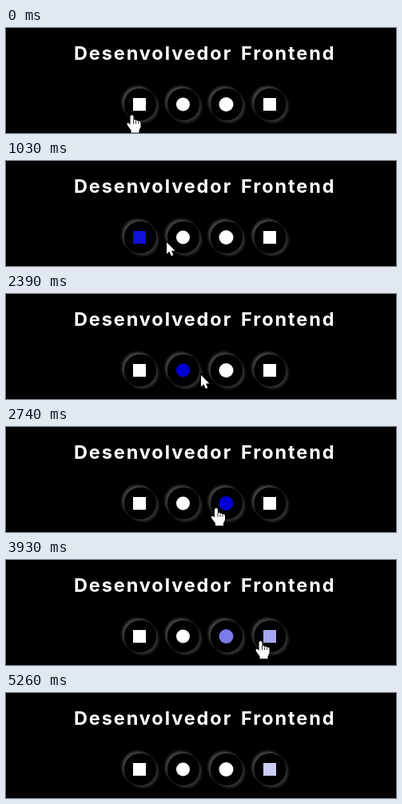
An HTML page with a canvas for the animation above (5280 ms loop, 488 by 132 pixels).

```html
<!DOCTYPE html>
<html lang="pt-BR">
<head>
<meta charset="utf-8">
<title>Desenvolvedor Frontend</title>
<style>
  html, body { margin: 0; width: 100%; height: 100%; overflow: hidden; background: #000; }
  canvas { display: block; }
</style>
</head>
<body>
<canvas id="stage" width="488" height="132"></canvas>
<script>
const ctx = document.getElementById('stage').getContext('2d');
const LOOP = 5280, FADE = 300, RADIUS = 20, ROW = 96;

// Hover colour fades in from `enter` and back out from `leave`.
const links = [
  { x: 168, size: 16, enter: 50, leave: 1010 },
  { x: 222, size: 17, round: true, enter: 1060, leave: 2420 },
  { x: 276, size: 18, round: true, enter: 2430, leave: 3720 },
  { x: 330.5, size: 16, enter: 3760, leave: 5020 }
];

const tips = [
  { text: 'Prosavix', x: 221, y: 116, w: 72, from: 1910, to: 2320 },
  { text: 'Kodrum', x: 272, y: 117, w: 54, from: 3130, to: 3590 },
  { text: 'Retralume', x: 331, y: 117, w: 69, from: 4530, to: 4930 }
];

// Pointer moves in even steps, slowing down by `pow`.
const start = { x: 157.5, y: 109.5 };
const moves = [
  { from: 70, to: 350, steps: 5, x: 162, y: 109, pow: 2 },
  { from: 890, to: 1380, steps: 8, x: 211, y: 102, pow: 3.4 },
  { from: 2320, to: 2740, steps: 7, x: 263, y: 102, pow: 3 },
  { from: 3590, to: 4070, steps: 8, x: 322, y: 102, pow: 2.9 },
  { from: 4930, to: 5260, steps: 5, x: 334, y: 140, pow: 1 }
];

const hand = new Path2D('M-2 2Q-2 0 0 0Q2 0 2 2V6Q4 5 5 7Q7 6 8 8Q11 7 11 10V15L9 19V22H-1V19L-4 15L-6 12Q-6 9 -4 10L-2 12Z');
const knuckles = new Path2D('M2 6V11M5 7.5V11M8 8.5V11');
const arrow = new Path2D('M0 0V14.5L3.4 11.4L5.7 17L8.3 15.9L6 10.4H10.4Z');

const clamp = v => Math.min(1, Math.max(0, v));
const easeOut = (p, pow) => 1 - Math.pow(1 - p, pow);

function pointerAt(t) {
  let { x, y } = start, time = 0;
  for (const m of moves) {
    if (t < m.from) break;
    const gap = (m.to - m.from) / (m.steps - 1);
    const step = Math.min(m.steps, Math.floor((t - m.from) / gap + 1e-6) + 1);
    const p = step / m.steps;
    x += (m.x - x) * easeOut(p, m.pow);
    y += (m.y - y) * easeOut(p, m.pow * 2);
    time = m.from + (step - 1) * gap;
  }
  return { x, y, time };
}

function disc(x, y, r) {
  ctx.beginPath();
  ctx.arc(x, y, r, 0, Math.PI * 2);
  ctx.fill();
}

function drawTitle() {
  ctx.font = '700 23.5px Inter, "Open Sans", sans-serif';
  ctx.letterSpacing = '1.9px';
  ctx.textAlign = 'center';
  ctx.fillStyle = '#fff';
  ctx.fillText('Desenvolvedor', 184, 40);
  ctx.fillText('Frontend', 353.3, 40);
}

function drawLink(link, time) {
  ctx.save();
  ctx.fillStyle = '#000';
  ctx.shadowBlur = 3;
  for (const [offset, color] of [[-3, '#404040'], [3, '#2c2e30']]) {
    ctx.shadowOffsetX = ctx.shadowOffsetY = offset;
    ctx.shadowColor = color;
    disc(link.x, ROW, RADIUS);
  }
  ctx.restore();

  const hover = clamp((time - link.enter) / FADE) - clamp((time - link.leave) / FADE);
  const rg = Math.round(255 * (1 - hover));
  const b = Math.round(255 - 43 * hover);
  ctx.fillStyle = `rgb(${rg},${rg},${b})`;
  const half = link.size / 2, x = link.x - 0.5;
  if (link.round) disc(x, ROW, half);
  else ctx.fillRect(Math.floor(x - half), ROW - half, link.size, link.size);
}

function drawTip(tip) {
  ctx.fillStyle = '#2b2b2b';
  ctx.fillRect(tip.x, tip.y, tip.w, 24);
  ctx.strokeStyle = '#8a8a8a';
  ctx.lineWidth = 1;
  ctx.strokeRect(tip.x + 0.5, tip.y + 0.5, tip.w - 1, 23);
  ctx.font = '12px "Open Sans", "Noto Sans", sans-serif';
  ctx.letterSpacing = '0px';
  ctx.textAlign = 'left';
  ctx.fillStyle = '#e0e0e0';
  ctx.fillText(tip.text, tip.x + 8, tip.y + 17);
}

function drawPointer({ x, y }) {
  const over = links.some(l => Math.hypot(x - l.x, y - ROW) < RADIUS);
  const shape = over ? hand : arrow;
  ctx.save();
  ctx.translate(x, y);
  ctx.strokeStyle = '#000';
  ctx.lineWidth = 2;
  ctx.stroke(shape);
  ctx.fillStyle = '#fff';
  ctx.fill(shape);
  if (over) {
    ctx.lineWidth = 0.8;
    ctx.stroke(knuckles);
  }
  ctx.restore();
}

function draw(now) {
  const t = now % LOOP;
  const pointer = pointerAt(t);
  ctx.fillStyle = '#000';
  ctx.fillRect(0, 0, 488, 132);
  drawTitle();
  links.forEach(link => drawLink(link, pointer.time));
  tips.filter(tip => t >= tip.from && t < tip.to).forEach(drawTip);
  drawPointer(pointer);
}

const began = performance.now();
function tick() {
  draw(performance.now() - began);
  requestAnimationFrame(tick);
}
tick();
</script>
</body>
</html>
```
